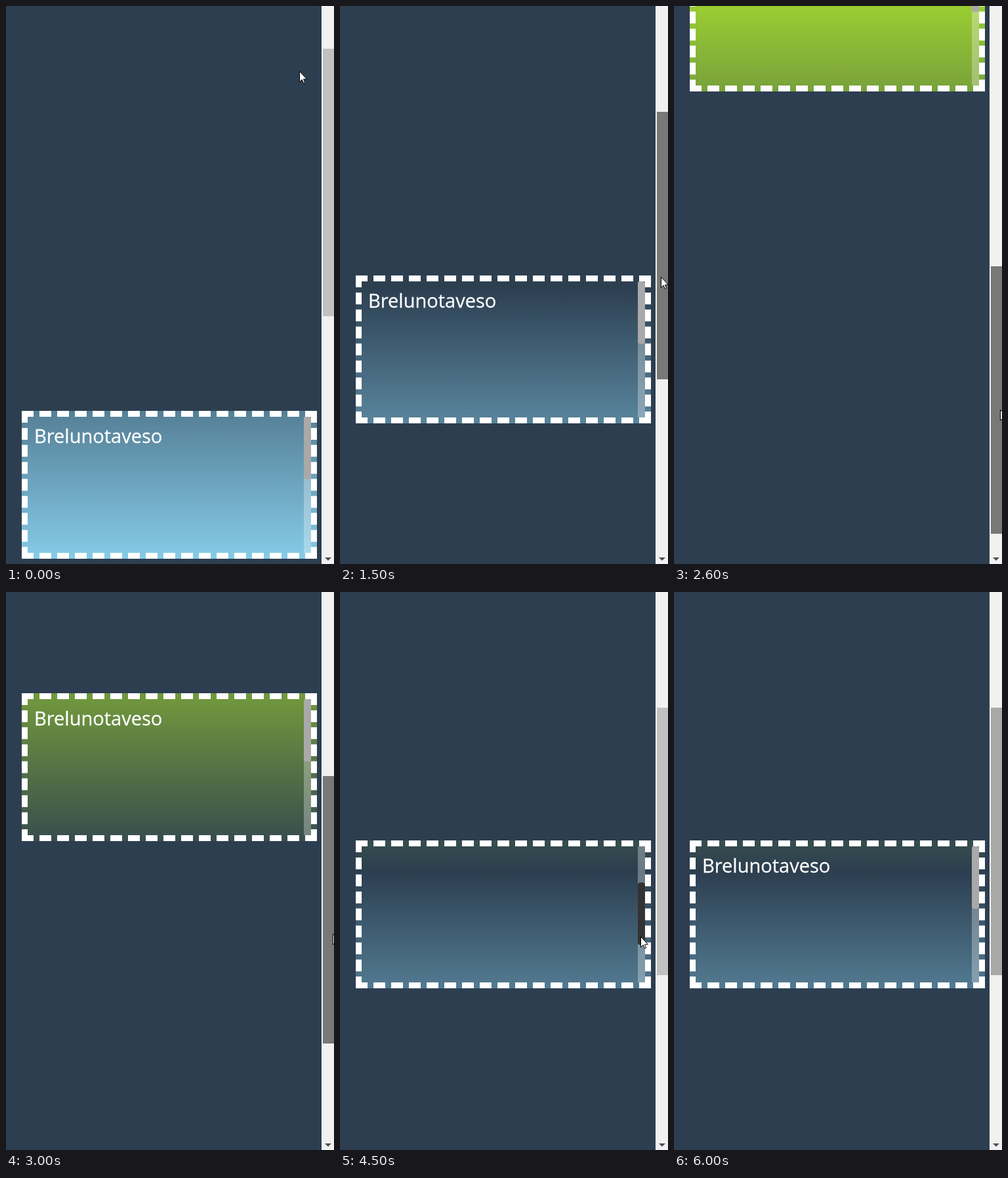
Recreate the animation shown at these times as an HTML page. Size 500 by 849 pixels, loop 6.5 s.

```html
<!DOCTYPE html>
<html lang="en">
<head>
<meta charset="utf-8">
<title>Fixed background scroll</title>
<style>
  html, body { margin: 0; width: 100%; height: 100%; overflow: hidden; background: #2d3e50; }
  div, svg { position: absolute; }
  #stage { inset: 0; overflow: hidden; }
  #box {
    left: 24px; width: 432px; height: 207px; overflow: hidden;
    border: 9px dashed #fff;
    background: linear-gradient(yellowgreen, #2c3e50, skyblue) fixed;
  }
  #label {
    left: 10px; color: #fff; font: 29px/40px "Open Sans", sans-serif;
    white-space: nowrap; -webkit-text-stroke: .3px #fff;
  }
  #innerTrack { right: 0; width: 11px; height: 207px; background: rgba(255, 255, 255, .3); }
  #innerThumb { width: 11px; height: 95px; border-radius: 4px; }
  #track { right: 0; top: 0; bottom: 0; width: 19px; background: #f1f1f1; }
  #thumb { right: 0; width: 17px; height: 407px; }
  #arrow { left: 5px; bottom: 5px; width: 10px; height: 5px; clip-path: polygon(0 0, 100% 0, 50% 100%); }
</style>
</head>
<body>
<div id="stage">
  <div id="box">
    <div id="label">Brelunotaveso</div>
    <div id="innerTrack"><div id="innerThumb"></div></div>
  </div>
  <div id="track"><div id="thumb"></div><div id="arrow"></div></div>
  <svg id="cursor" width="14" height="21">
    <path d="M.5 .5V16.5L4.2 13 6.6 18.5 8.8 17.5 6.5 12.2H11.5Z" fill="#fff" stroke="#000"/>
  </svg>
</div>
<script>
const LOOP = 6500, STEP = 100, THUMB_TOP = 65, MAX_SCROLL = 360;
const [box, label, innerThumb, thumb, arrow, cursor] =
  ['box', 'label', 'innerThumb', 'thumb', 'arrow', 'cursor'].map(id => document.getElementById(id));

// Progress from 0 to 1 between two times.
const ramp = (t, from, to) => Math.min(1, Math.max(0, (t - from) / (to - from)));

// Down to 1 at the peak, then back to 0.
const stroke = (t, from, peak, to) => ramp(t, from, peak) - ramp(t, peak, to);

// Page thumb travel: a slowly accelerating drag down, then a steady drag back.
function pageScroll(t) {
  const u = Math.max(0, t - 1100) / 100;
  const down = Math.min(MAX_SCROLL, 22.6 * u + .344 * u * u);
  return down - 249 * ramp(t, 2500, 3360);
}

const innerScroll = t => 109 * stroke(t, 4300, 4700, 5230) + 102 * stroke(t, 5300, 5700, 5800);

function cursorPos(t, page, inner) {
  const arc = ramp(t, 0, 700), reach = ramp(t, 700, 900), cross = ramp(t, 3700, 4100);
  return {
    x: 447 + 32 * arc - 150 * Math.sin(Math.PI * arc) + 10 * reach + 9 * ramp(t, 1900, 2700) - 40 * cross,
    y: 99 + 200 * arc + 18 * reach + page * (1.03 - .0004 * page) + 43 * cross + inner
  };
}

const setTop = (node, y) => node.style.top = Math.round(y) + 'px';

function draw(now) {
  const t = Math.floor(now % LOOP / STEP) * STEP;
  const page = pageScroll(t), inner = innerScroll(t), pos = cursorPos(t, page, inner);
  const dragging = t >= 1100 && t < 3700;
  const hovering = t >= 800 && t < 1100 || t >= 6000;
  const onInner = t >= 4100 && t < 6000;

  setTop(box, 616 - page * 2.147);
  setTop(thumb, THUMB_TOP + page);
  thumb.style.background = dragging ? '#787878' : hovering ? '#a8a8a8' : '#c1c1c1';
  arrow.style.background = page >= MAX_SCROLL ? '#a3a3a3' : '#505050';

  setTop(label, 9 - inner * 2.4);
  setTop(innerThumb, inner);
  innerThumb.style.background = onInner ? '#333' : '#a9a9a9';

  cursor.style.left = Math.round(pos.x) + 'px';
  setTop(cursor, pos.y);
  cursor.style.display = t < 6000 ? '' : 'none';
}

const start = performance.now();
function tick() {
  draw(performance.now() - start);
  requestAnimationFrame(tick);
}
tick();
</script>
</body>
</html>
```
